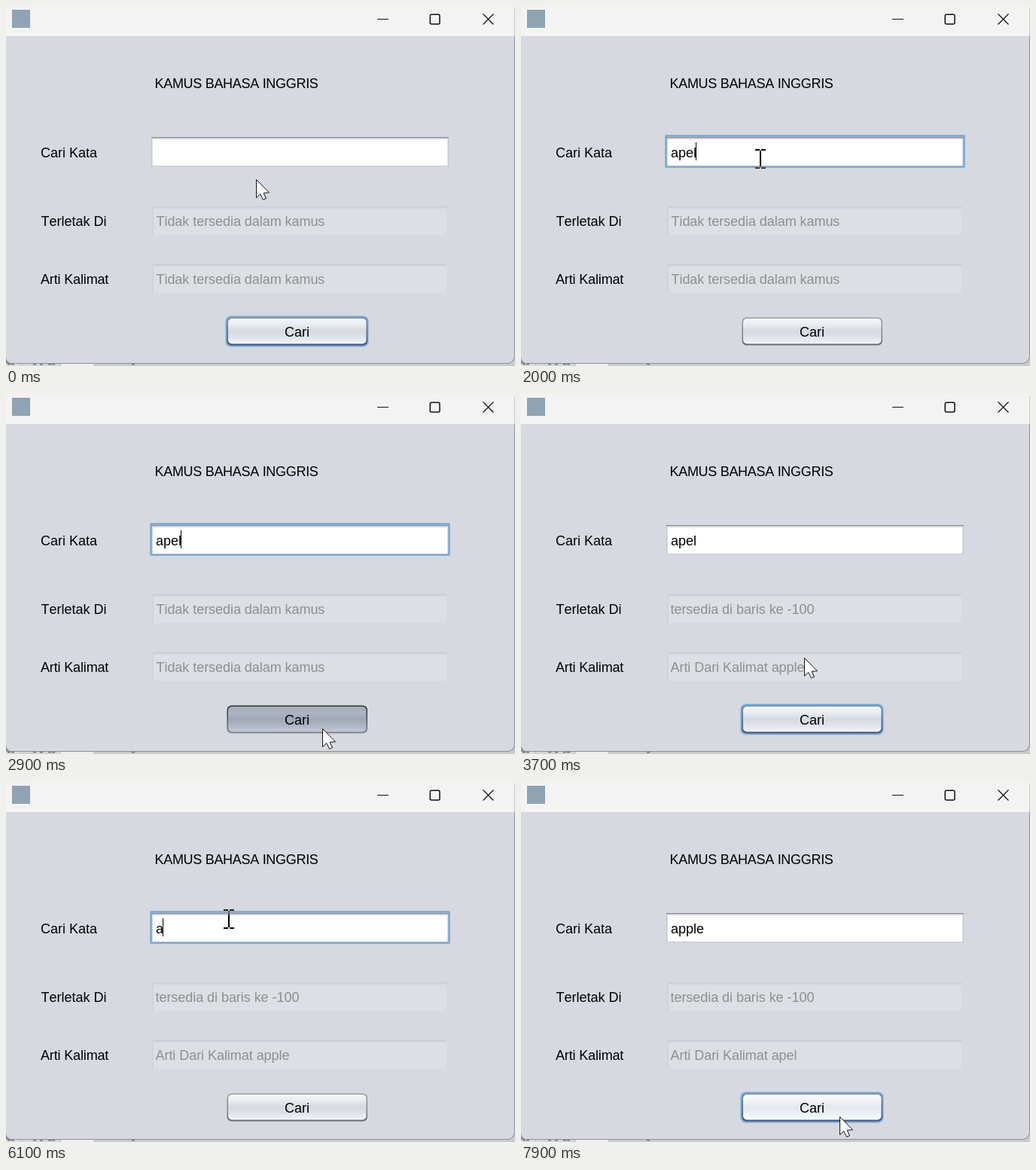
An HTML page with a canvas for the animation above (8 s loop, 676 by 478 pixels).

```html
<!DOCTYPE html>
<html lang="id">
<head>
<meta charset="utf-8">
<title>Kamus</title>
<style>
html, body { margin: 0; width: 100%; height: 100%; overflow: hidden; background: #c9cacc; }
canvas { display: block; }
</style>
</head>
<body>
<canvas id="stage" width="676" height="478"></canvas>
<script>
const c = document.getElementById('stage').getContext('2d');
const LOOP = 8000, STEP = 100, BLUE = '#73a4d1', PANEL = '#d6d9df';
const EMPTY = 'Tidak tersedia dalam kamus', FOUND = 'tersedia di baris ke -100';

// Pointer stops: time, x, y
const path = [
  [0, 333, 230], [200, 333, 230], [600, 318, 203], [2100, 318, 203],
  [2600, 421, 444], [3300, 421, 444], [3700, 377, 350], [4300, 296, 182],
  [6900, 296, 182], [7200, 380, 380], [7500, 424, 444], [8000, 424, 444]
];
// Search box: time, text, caret position
const edits = [
  [700, '', 0], [1100, 'a', 1], [1300, 'ap', 2], [1500, 'ape', 3], [1700, 'apel', 4],
  [4450, 'apel', 0], [5300, 'apel', 4], [5600, 'ape', 3], [5700, 'ap', 2], [5800, 'a', 1],
  [6300, 'ap', 2], [6500, 'app', 3], [6700, 'appl', 4], [6900, 'apple', 5]
];
// Button presses: time down, time up, result
const clicks = [[2800, 3000, 'Arti Dari Kalimat apple'], [7600, 7800, 'Arti Dari Kalimat apel']];

function pointer(t) {
  const i = path.findIndex(p => p[0] > t);
  const [t0, x0, y0] = path[i - 1], [t1, x1, y1] = path[i];
  const k = (t - t0) / (t1 - t0), e = k * k * (3 - 2 * k);
  return [x0 + (x1 - x0) * e, y0 + (y1 - y0) * e];
}

function rect(x, y, w, h, color) {
  c.fillStyle = color;
  c.fillRect(x, y, w, h);
}

function text(s, x, y, color = '#000', spacing = 0) {
  c.font = '18px "Liberation Sans", Arial, sans-serif';
  c.fontKerning = 'none';
  c.letterSpacing = spacing + 'px';
  c.fillStyle = color;
  c.fillText(s, x, y);
}

function round(x, y, w, h, r, fill) {
  c.fillStyle = fill;
  c.beginPath();
  c.roundRect(x, y, w, h, r);
  c.fill();
}

function shade(y, h, colors) {
  const g = c.createLinearGradient(0, y, 0, y + h);
  colors.forEach((col, i) => g.addColorStop(i / (colors.length - 1), col));
  return g;
}

function backdrop() {
  rect(0, 0, 676, 478, '#c9cacc');
  rect(0, 475, 18, 3, '#dcdddd');
  rect(20, 475, 51, 3, '#d3d4d5');
  rect(73, 475, 43, 3, '#ededed');
  for (const x of [2, 7, 36, 45, 56, 61, 167]) rect(x, 475, 4, 1.5, '#77787c');
  round(-9, -9, 685, 484, [0, 0, 10, 0], '#909195');
  round(-9, -9, 684, 483, [0, 0, 9, 0], PANEL);
  c.fillStyle = '#909195';
  c.beginPath();
  c.moveTo(0, 466); c.quadraticCurveTo(1, 474, 9, 475); c.lineTo(0, 475);
  c.fill();
}

function line(width, ...pts) {
  c.lineWidth = width;
  c.beginPath();
  for (const [x, y] of pts) c.lineTo(x, y);
  c.stroke();
}

function titleBar() {
  rect(0, 0, 676, 40, '#f3f3f3');
  rect(675, 3, 1, 37, '#c4c5c7');
  rect(8, 5, 24, 24, '#8fa3b5');
  c.strokeStyle = '#111';
  line(1, [493, 17.5], [508, 17.5]);
  line(1.2, [633.5, 10.5], [647.5, 24.5]);
  line(1.2, [647.5, 10.5], [633.5, 24.5]);
  c.lineWidth = 1.5;
  c.beginPath();
  c.roundRect(563.25, 11.25, 12.75, 12.75, 2);
  c.stroke();
}

function searchBox(focused) {
  if (focused) {
    round(191, 171, 399, 44, 2, '#8fb3d6');
    round(192, 172, 397, 42, 1, BLUE);
    rect(193, 173, 395, 40, '#9bb6d2');
  } else rect(193, 174, 395, 39, '#c3c6cc');
  rect(194.5, 175, 392, 37, '#fff');
  rect(193, 174, 395, 1.5, '#8d8f95');
  rect(194, 175.5, 393, 1, '#c0c1c5');
  rect(194, 176.5, 393, 1, '#e8e8ea');
}

function disabledBox(y, s) {
  rect(194, y, 393, 38, '#dcdfe3');
  rect(194, y, 393, 1, '#c6cad0');
  rect(194, y + 1, 393, 2, '#d2d5da');
  rect(194, y, 2, 38, '#d1d4da');
  rect(585, y, 2, 38, '#d6d9de');
  text(s, s === EMPTY ? 199.5 : 198.5, y + 26, '#8e8f91', -0.05);
}

function button(focused, pressed, hover) {
  if (focused) {
    round(291, 411, 191, 42, 8, '#a5c1de');
    round(292, 412, 189, 40, 7, BLUE);
  }
  const edge = pressed ? ['#2e3138', '#4a4f59', '#7d8592']
    : focused ? ['#8195ad', '#5d7089', '#46566c'] : ['#9b9ea5', '#858890', '#676a72'];
  round(293.5, 413.5, 186.5, 37, 6, shade(413, 37, edge));
  round(295, 415, 183.5, 33.5, 5, shade(415, 33, pressed
    ? ['#a4abb8', '#aeb5c1', '#a0a8b6', '#adb5c1', '#c2c9d4']
    : hover ? ['#fdfdfe', '#f2f3f7', '#e5e7ee', '#eceef4', '#fbfbff']
            : ['#f8f8fa', '#e9ebef', '#d6d9df', '#dfe2e8', '#f2f4f9']));
  text('Cari', 370, 439);
}

function arrow(x, y) {
  const pts = [[0, 0], [0, 24], [5.3, 19], [9, 26.7], [13, 25], [9.6, 17.8], [17, 17.3]];
  c.beginPath();
  for (const [dx, dy] of pts) c.lineTo(x + dx - 0.5, y + dy + 0.5);
  c.closePath();
  c.fillStyle = '#fff';
  c.fill();
  c.strokeStyle = '#111';
  c.lineWidth = 1;
  c.stroke();
}

function beam(x, y) {
  x = Math.round(x); y = Math.round(y);
  c.globalCompositeOperation = 'difference';
  rect(x - 1, y - 11, 2, 22, '#fff');
  for (const dy of [-13, 11]) {
    rect(x - 7, y + dy, 6, 2, '#fff');
    rect(x + 1, y + dy, 6, 2, '#fff');
  }
  c.globalCompositeOperation = 'source-over';
}

function draw(t) {
  const [x, y] = pointer(t);
  const [since, word, pos] = edits.findLast(e => e[0] <= t) || [0, '', 0];
  const done = clicks.findLast(k => k[1] <= t);
  const pressed = clicks.some(k => k[0] <= t && t < k[1]);
  const typing = since > 0 && !(done && done[1] > since);
  const hover = x > 293 && x < 480 && y > 414 && y < 450;

  backdrop();
  titleBar();
  text('KAMUS BAHASA INGGRIS', 197.5, 109, '#000', -0.3);
  text('Cari Kata', 46, 201);
  text('Terletak Di', 46.5, 292);
  text('Arti Kalimat', 46, 369, '#000', -0.15);
  searchBox(typing);
  text(word, 199, 201);
  if (typing && Math.floor((t - since) / 500) % 2 === 0) {
    rect(Math.round(198.4 + c.measureText(word.slice(0, pos)).width), 181, 1, 24, '#000');
  }
  disabledBox(266, done ? FOUND : EMPTY);
  disabledBox(343, done ? done[2] : EMPTY);
  button(!typing, pressed, hover);
  const inBox = x > 193 && x < 588 && y > 174 && y < 213;
  (inBox ? beam : arrow)(x, y);
}

const start = performance.now();
function frame() {
  const t = Math.max(0, performance.now() - start) % LOOP;
  draw(Math.floor(t / STEP) * STEP);
  requestAnimationFrame(frame);
}
frame();
</script>
</body>
</html>
```
